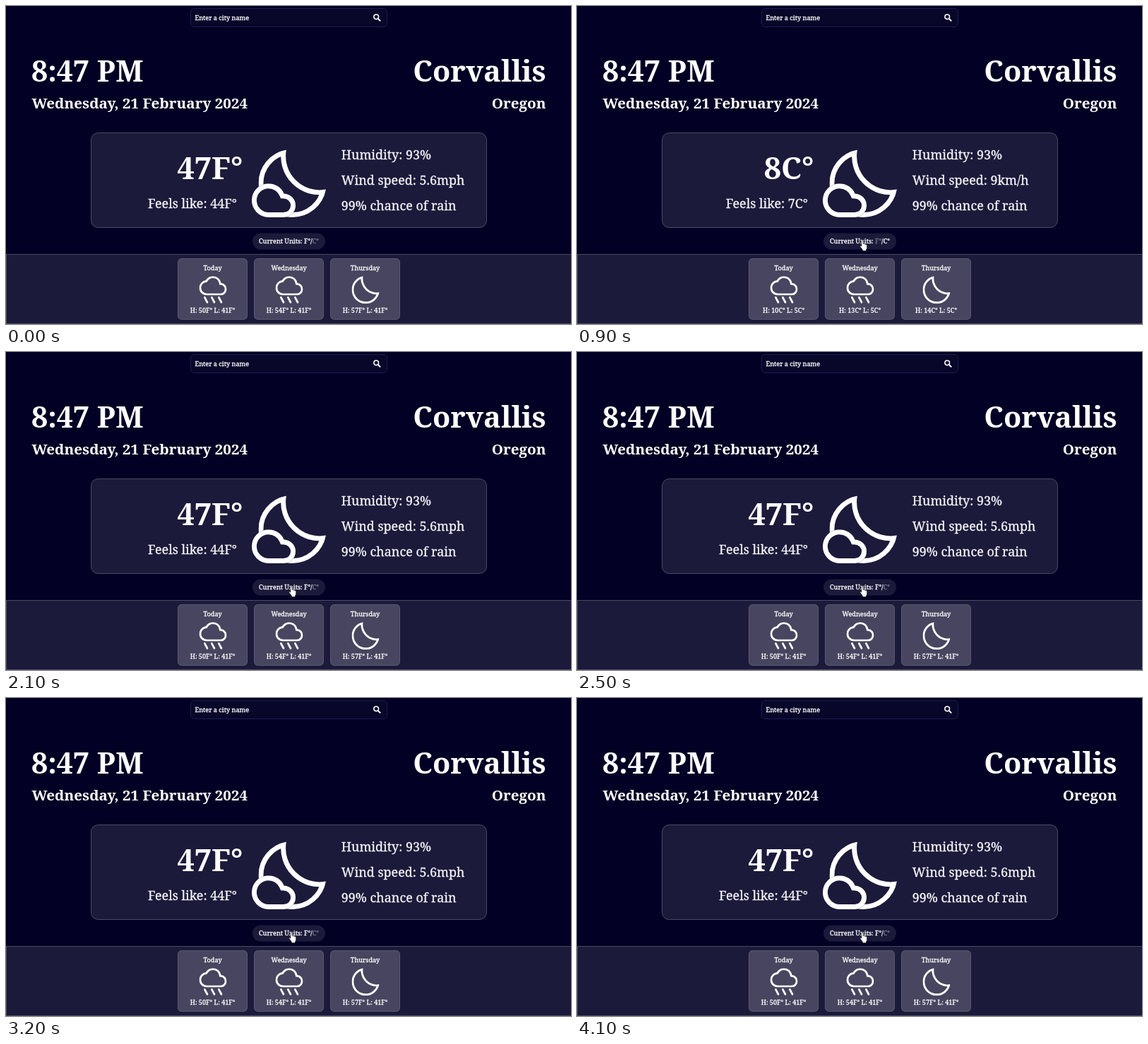
An HTML page that plays this animation: 800 by 450 pixels, repeating every 4200 ms.

```html
<!DOCTYPE html>
<html lang="en">
<head>
<meta charset="utf-8">
<title>Weather</title>
<style>
  html, body { margin: 0; width: 100%; height: 100%; overflow: hidden; background: #020024; }
  svg { display: block; width: 800px; height: 450px; }
  text { font: 500 9.15px "Noto Serif", serif; color: #fff; fill: currentColor; stroke: currentColor; stroke-width: .3px; }
  .title, .sub, .temp { font-weight: 700; stroke: none; }
  .title { font-size: 41.4px; }
  .sub { font-size: 20.67px; }
  .temp { font-size: 43.5px; }
  .info { font-size: 17.93px; color: #f4f4f8; }
  .end { text-anchor: end; }
  .mid { text-anchor: middle; }
  .glass { fill: #fff; fill-opacity: .1; stroke: #fff; stroke-opacity: .25; }
  .card { fill-opacity: .19; stroke-opacity: .2; }
  .search { fill-opacity: .025; stroke: #8080ff; stroke-opacity: .2; }
  .pill { stroke: none; }
  .off { color: #77758a; }
  /* Clipped to its own shape, so only the inner half of the stroke shows. */
  .outline { fill: none; stroke: #fff; stroke-width: 116; }
</style>
</head>
<body>
<svg viewBox="0 0 800 450">
  <defs>
    <path id="moonShape" d="M484-80q-84 0-157.500-32t-128-86.500Q144-253 112-326.500T80-484q0-146 93-257.500T410-880q-18 99 11 193.500T521-521q71 71 165.500 100T880-410q-26 144-138 237T484-80Z"/>
    <path id="rainShape" d="M300-320q-91 0-155.500-64.500T80-540q0-83 55-145t136-73q32-57 87.500-89.500T480-880q90 0 156.500 57.500T717-679q69 6 116 57t47 122q0 75-52.500 127.500T700-320Z"/>
    <path id="cloudShape" d="M240-80q-83 0-141.500-58.500T40-280q0-83 58.500-141.500T240-480q60 0 109.500 32.500T423-360q57 2 97 42.500t40 97.500q0 58-41 99t-99 41Z"/>
    <clipPath id="moonClip"><use href="#moonShape"/></clipPath>
    <clipPath id="rainClip"><use href="#rainShape"/></clipPath>
    <clipPath id="cloudClip"><use href="#cloudShape"/></clipPath>
    <g id="moon"><g clip-path="url(#moonClip)"><use class="outline" href="#moonShape"/></g></g>
    <g id="cloud"><g clip-path="url(#cloudClip)"><use class="outline" href="#cloudShape"/></g></g>
    <g id="rain">
      <g clip-path="url(#rainClip)"><use class="outline" href="#rainShape"/></g>
      <path d="M240-260l75 140M445-260l75 140M650-260l75 140" fill="none" stroke="#fff" stroke-width="56" stroke-linecap="round"/>
    </g>
  </defs>

  <rect class="glass search" x="261.500" y="3.500" width="278" height="26" rx="5"/>
  <text x="267.500" y="20">Enter a city name</text>
  <path d="M526.800 18l3.400 3.400" stroke="#fff" stroke-width="1.900"/>
  <circle cx="524.200" cy="15.300" r="3.300" fill="none" stroke="#fff" stroke-width="1.600"/>

  <text class="title" x="36" y="107.200">8:47 PM</text>
  <text class="sub" x="36.500" y="145.300">Wednesday, 21 February 2024</text>
  <text class="title end" x="764.800" y="107.200">Corvallis</text>
  <text class="sub end" x="764.500" y="145.300">Oregon</text>

  <rect class="glass" x="120.500" y="179.500" width="560" height="134" rx="10"/>
  <text class="temp end" id="temp" x="335.500" y="245.200"></text>
  <text class="info end" id="feels" x="327" y="286"></text>
  <g transform="translate(343.200 308.500) scale(.1193)">
    <use href="#moon" x="40"/>
    <use href="#cloudShape" fill="#1b193a"/>
    <use href="#cloud"/>
  </g>
  <text class="info" x="474.800" y="217">Humidity: 93%</text>
  <text class="info" id="wind" x="474.800" y="253"></text>
  <text class="info" x="474.800" y="289">99% chance of rain</text>

  <rect class="glass pill" x="349" y="321.500" width="103" height="23" rx="11.500"/>
  <text class="mid" x="400.500" y="336">Current Units: <tspan id="unitF">F°</tspan>/<tspan id="unitC">C°</tspan></text>

  <rect class="glass" x=".5" y="351.500" width="801" height="98"/>
  <g id="days"></g>

  <path id="cursor" fill="#fff" stroke="#111" stroke-width=".7" stroke-linejoin="round" d="M402.800 333q0-1.300 1.200-1.300t1.200 1.300v3.500q2-.6 2.300.5 1.500-.4 1.700.6 1.500-.3 1.500 1.200v3q0 1.800-1.200 3v1.800h-5.200v-1.600l-3.300-4.500q-.6-1.300.5-1.500l1.300 1Z"/>
</svg>
<script>
  const LOOP = 4200, CURSOR_IN = 100, TO_METRIC = 200, TO_IMPERIAL = 2000;
  const $ = id => document.getElementById(id);
  const units = {
    F: { temp: "47F°", feels: "44F°", wind: "5.6mph", days: [[50, 41], [54, 41], [57, 41]] },
    C: { temp: "8C°", feels: "7C°", wind: "9km/h", days: [[10, 5], [13, 5], [14, 5]] }
  };

  $("days").innerHTML = [["Today", "rain"], ["Wednesday", "rain"], ["Thursday", "moon"]].map(([day, icon], i) => `
    <g transform="translate(${292.5 + 108 * i} 0)">
      <rect class="glass card" x="-49" y="357.500" width="98" height="86" rx="5"/>
      <text class="mid" y="374.300">${day}</text>
      <use href="#${icon}" transform="translate(-22.900 425.100) scale(.0488)"/>
      <text class="mid range" y="434"></text>
    </g>`).join("");
  const ranges = document.querySelectorAll(".range");

  let shown;
  function setUnit(unit) {
    if (unit === shown) return;
    shown = unit;
    const data = units[unit];
    $("temp").textContent = data.temp;
    $("feels").textContent = "Feels like: " + data.feels;
    $("wind").textContent = "Wind speed: " + data.wind;
    data.days.forEach(([high, low], i) => {
      ranges[i].textContent = `H: ${high}${unit}° L: ${low}${unit}°`;
    });
    for (const u of "FC") $("unit" + u).classList.toggle("off", u !== unit);
  }

  function draw() {
    const t = performance.now() % LOOP;
    setUnit(t >= TO_METRIC && t < TO_IMPERIAL ? "C" : "F");
    $("cursor").style.display = t < CURSOR_IN ? "none" : "";
    requestAnimationFrame(draw);
  }
  draw();
</script>
</body>
</html>
```
